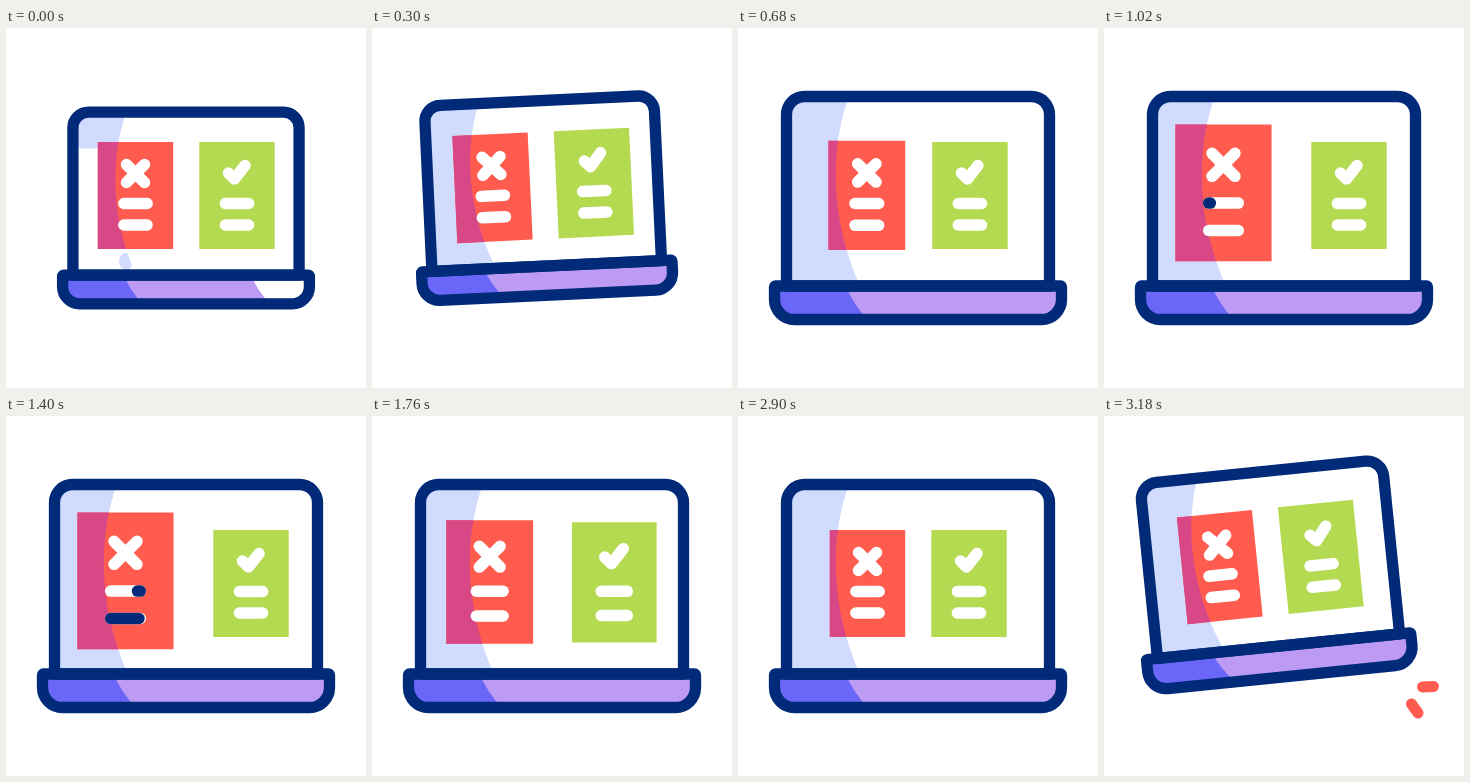
An HTML page with a canvas that plays this animation: 360x360 px, repeating every 3200 ms.

```html
<!DOCTYPE html>
<html lang="en">
<head>
<meta charset="utf-8">
<title>Laptop with two choices</title>
<style>
  html, body { margin: 0; width: 100%; height: 100%; overflow: hidden; background: #fff; }
  canvas { display: block; width: 360px; height: 360px; }
</style>
</head>
<body>
<canvas id="stage"></canvas>
<script>
const LOOP = 3200, HOLD = 220, PEAK = 390, OPEN = 640, LEAVE = 2920, END = 3180;
const NAVY = '#012a78', RED = '#ff5c4f', GREEN = '#b3da50', MAGENTA = '#d84886';
const PALE = '#d0dbfd', INDIGO = '#6a66f7', LILAC = '#bd9af3', WHITE = '#fff';

const canvas = document.getElementById('stage');
const ctx = canvas.getContext('2d');
const dpr = window.devicePixelRatio || 1;
canvas.width = canvas.height = 360 * dpr;

const ramp = (t, a, b) => Math.min(1, Math.max(0, (t - a) / (b - a)));
const ease = (t, a, b) => { const u = ramp(t, a, b); return u * u * (3 - 2 * u); };
const mix = (a, b, u) => a + (b - a) * u;

function laptopPose(t) {
  const lean = t < PEAK ? ease(t, HOLD, PEAK)
    : t < LEAVE ? 1 - ease(t, PEAK, OPEN) : ease(t, LEAVE, END);
  const size = t < LEAVE ? ease(t, HOLD, OPEN) : 1 - ease(t, LEAVE, LEAVE + 500);
  return {
    angle: -0.101 * lean,
    x: 180 - 12.7 * Math.sin(lean * Math.PI / 2),
    y: 180 - 21.6 * lean,
    k: mix(0.86, 1, size)
  };
}

function useStage() { ctx.setTransform(dpr, 0, 0, dpr, 0, 0); }

function usePose(p) {
  useStage();
  ctx.translate(p.x, p.y);
  ctx.rotate(p.angle);
}

function fill(color) {
  ctx.fillStyle = color;
  ctx.fill();
}

function stroke(points, color, width) {
  ctx.beginPath();
  for (const [x, y] of points) ctx.lineTo(x, y);
  ctx.strokeStyle = color;
  ctx.lineWidth = width;
  ctx.stroke();
}

// Runs paint with drawing limited to the given path
function within(path, paint) {
  ctx.save();
  path();
  ctx.clip();
  paint();
  ctx.restore();
}

function screenPath(k) {
  ctx.beginPath();
  ctx.roundRect(-131.5 * k, -111.5 * k, 263 * k, 189.5 * k, [18 * k, 18 * k, 0, 0]);
}

function basePath(k) {
  ctx.beginPath();
  ctx.roundRect(-143.5 * k, 78 * k, 287 * k, 33.5 * k, [1, 1, 20 * k, 20 * k]);
}

// Everything left of the curved shade edge on the screen
function shadePath(k) {
  ctx.beginPath();
  ctx.moveTo(-160 * k, -112 * k);
  ctx.lineTo(-69 * k, -112 * k);
  ctx.bezierCurveTo(-88 * k, -60 * k, -88 * k, 10 * k, -59 * k, 76 * k);
  ctx.lineTo(-160 * k, 76 * k);
  ctx.closePath();
}

// Part of the base between two x positions, with a slanted right-leaning edge
function basePart(left, right, k, color) {
  ctx.beginPath();
  ctx.moveTo(left * k, 76 * k);
  ctx.lineTo(right * k, 76 * k);
  ctx.quadraticCurveTo((right + 7) * k, 95 * k, (right + 23) * k, 112 * k);
  ctx.lineTo(left * k, 112 * k);
  fill(color);
}

// While the laptop rests, the shade is only a corner patch and the base has a bright end
function laptopFill(k, resting) {
  within(() => screenPath(k), () => {
    shadePath(k);
    if (resting) {
      ctx.clip();
      ctx.beginPath();
      ctx.ellipse(-112 * k, -112 * k, 60 * k, 43 * k, 0, 0, 2 * Math.PI);
      ctx.ellipse(-70 * k, 62 * k, 8 * k, 10 * k, 0, 0, 2 * Math.PI);
    }
    fill(PALE);
  });
  within(() => basePath(k), () => {
    basePart(-150, resting ? 75 : 150, k, LILAC);
    basePart(-150, -73, k, INDIGO);
  });
}

function laptopLines(k) {
  ctx.strokeStyle = NAVY;
  ctx.lineWidth = 11.3;
  screenPath(k);
  ctx.stroke();
  basePath(k);
  ctx.stroke();
}

const CROSS = [[[-9, -31], [9, -13]], [[9, -31], [-9, -13]]];
const TICK = [[[-8.5, -22.5], [-2.5, -16.5], [8, -30]]];

function card(x, grow, color, mark, t, start, k) {
  const s = 1 + 0.275 * grow;
  const y = -12.5 - 2.6 * grow;
  const boxPath = () => {
    ctx.beginPath();
    ctx.rect(x - 37.7 * s, y - 53.6 * s, 75.4 * s, 107.2 * s);
  };
  boxPath();
  fill(color);
  if (color === RED) within(boxPath, () => { shadePath(k); fill(MAGENTA); });

  for (const part of mark) {
    stroke(part.map(([px, py]) => [x + px * s, y + py * s]), WHITE, 11.5);
  }
  // A dark stroke runs through each text line, one after the other
  for (let i = 0; i < 2; i++) {
    const ly = y + (8 + 21.5 * i) * s, left = x - 11.6 * s, right = x + 11.6 * s;
    stroke([[left, ly], [right, ly]], WHITE, 11.5);
    const from = start + i * 200;
    const head = ramp(t, from, from + 200), tail = ramp(t, from + 210, from + 410);
    if (head > 0 && tail < 1) {
      stroke([[mix(left, right, tail), ly], [mix(left, right, head) + 0.01, ly]], NAVY, 11.5);
    }
  }
}

function cards(t, k) {
  const first = ease(t, 640, 900), swap = ease(t, 1640, 1900), last = ease(t, 2640, 2900);
  const redX = -50.5 - 10 * first - 4 * swap + 14 * last;
  const greenX = 51 + 14 * first - 6 * swap - 8 * last;
  card(redX, first - swap, RED, CROSS, t, 1010, k);
  card(greenX, swap - last, GREEN, TICK, t, 2010, k);
}

function sparks(t) {
  const u = ramp(t, END - 70, END);
  if (!u) return;
  stroke([[318.5, 271], [318.5 + 11 * u, 271 - 0.5 * u]], RED, 11);
  stroke([[307.5, 288], [307.5 + 6.5 * u, 288 + 9 * u]], RED, 11);
}

function draw(t) {
  const pose = laptopPose(t);
  useStage();
  ctx.lineCap = ctx.lineJoin = 'round';
  ctx.fillStyle = WHITE;
  ctx.fillRect(0, 0, 360, 360);
  sparks(t);
  usePose(pose);
  laptopFill(pose.k, t < HOLD);
  cards(t, pose.k);
  laptopLines(pose.k);
}

const begin = performance.now();
function tick() {
  draw((performance.now() - begin) % LOOP);
  requestAnimationFrame(tick);
}
tick();
</script>
</body>
</html>
```
